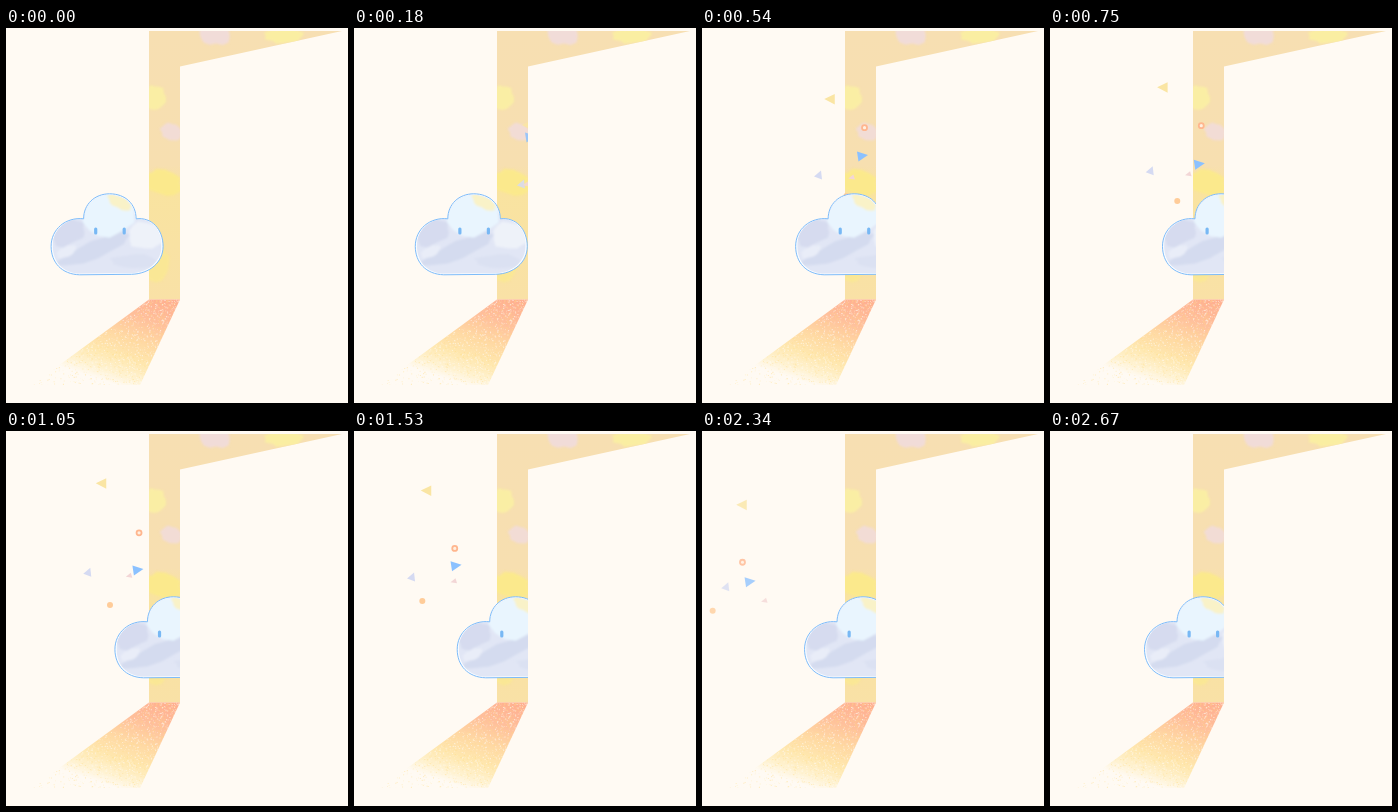
An HTML page that plays this animation: 342x375 px, repeating every 2.7 s.

```html
<!DOCTYPE html>
<html lang="en">
<head>
<meta charset="utf-8">
<title>Cloud at the door</title>
<style>
html, body { margin: 0; width: 100%; height: 100%; overflow: hidden; background: #fffaf3; }
svg { display: block; width: 342px; height: 375px; }
</style>
</head>
<body>
<svg viewBox="0 0 342 375" xmlns="http://www.w3.org/2000/svg">
  <defs>
    <path id="shape" d="M33 25.500C33 11 44 .5 59 .5C75 .5 85.500 11 85.500 25.500C101 23.500 112.500 36 112.500 53C112.500 69 99 80.500 81 81L29 81.500C11 81 .5 69 .5 53C.5 36 15 23.500 33 25.500Z"/>
    <clipPath id="frame"><path d="M143 3H336L174 38.5V271.5H143Z"/></clipPath>
    <clipPath id="room"><path d="M0 0H174V375H0Z"/></clipPath>
    <clipPath id="floor"><path d="M143 271.5H174L134 357H26Z"/></clipPath>
    <clipPath id="puff"><use href="#shape" transform="translate(1.7 1.2) scale(.97)"/></clipPath>
    <filter id="soft" x="-30%" y="-30%" width="160%" height="160%"><feGaussianBlur stdDeviation="1"/></filter>
    <linearGradient id="wall" gradientUnits="userSpaceOnUse" x1="0" y1="3" x2="0" y2="271">
      <stop offset="0" stop-color="#f7dfb2"/><stop offset=".5" stop-color="#f7dfb0"/>
      <stop offset=".6" stop-color="#f9e3a0"/><stop offset="1" stop-color="#f9e1a6"/>
    </linearGradient>
    <linearGradient id="light" gradientUnits="userSpaceOnUse" x1="156" y1="271" x2="126" y2="362">
      <stop offset="0" stop-color="#ffaf90"/><stop offset=".25" stop-color="#ffbf9b"/>
      <stop offset=".5" stop-color="#ffd9a4"/><stop offset=".7" stop-color="#ffe7ae"/>
      <stop offset=".88" stop-color="#fff2d0"/><stop offset="1" stop-color="#fffaf3"/>
    </linearGradient>
  </defs>

  <rect width="342" height="375" fill="#fffaf3"/>

  <g clip-path="url(#frame)">
    <rect x="140" width="200" height="275" fill="url(#wall)"/>
    <g id="paint" filter="url(#soft)"></g>
  </g>

  <g clip-path="url(#floor)">
    <rect x="20" y="270" width="160" height="90" fill="url(#light)"/>
    <path id="gold" fill="#ffdc85" opacity=".45"/>
    <path id="grain" fill="#fffaf3" opacity=".6"/>
  </g>

  <g clip-path="url(#room)">
    <g id="bits"></g>
    <g id="cloud">
      <use href="#shape" fill="#f8fbff"/>
      <g clip-path="url(#puff)">
        <rect width="113" height="82" fill="#e1e6f5"/>
        <g id="tint" filter="url(#soft)"></g>
      </g>
      <use href="#shape" fill="none" stroke="#7dbbf9"/>
      <g fill="#78b8f4">
        <rect x="43.500" y="34.300" width="3.200" height="7" rx="1.500"/>
        <rect x="72" y="34.300" width="3.200" height="7" rx="1.500"/>
      </g>
    </g>
  </g>
</svg>
<script>
const LOOP = 2700, STEP = 30;
const el = id => document.getElementById(id);

let seed = 17;
const rnd = () => (seed = (seed * 16807) % 2147483647) / 2147483647;

function addPath(parent, d, attrs) {
  const node = document.createElementNS('http://www.w3.org/2000/svg', 'path');
  node.setAttribute('d', d);
  for (const k in attrs) node.setAttribute(k, attrs[k]);
  el(parent).append(node);
  return node;
}

// Ragged oval brush mark
function blob(parent, fill, x, y, rx, ry, turn = 0) {
  const n = 16, pts = [];
  for (let i = 0; i < n; i++) {
    const a = i / n * Math.PI * 2, r = 0.85 + 0.3 * rnd();
    pts.push(`${(rx * r * Math.cos(a)).toFixed(1)} ${(ry * r * Math.sin(a)).toFixed(1)}`);
  }
  addPath(parent, `M${pts.join('L')}Z`, { fill, transform: `translate(${x} ${y}) rotate(${turn})` });
}

blob('paint', '#f1dcd8', 210, 6, 16, 11);
blob('paint', '#faeea2', 278, 8, 19, 8);
blob('paint', '#faeea4', 149, 69, 11, 12);
blob('paint', '#f2dcd5', 165, 104, 11, 9, 35);
blob('paint', '#fbe98c', 156, 155, 21, 12, 15);
blob('paint', '#fae795', 150, 235, 15, 18);

blob('tint', '#d6dbef', 17, 39, 19, 13, -15);
blob('tint', '#d4dbef', 44, 56, 40, 9, -23);
blob('tint', '#e9f5fe', 59, 20, 28, 24);
blob('tint', '#eef2f9', 95, 42, 18, 14);
blob('tint', '#dbe1f2', 84, 68, 24, 7);
blob('tint', '#e9edf8', 16, 58, 11, 5, -25);
blob('tint', '#f9f2c8', 69, 9, 13, 6, 25);

// Speckles over the light, denser towards its far edge
function spray(id, count, power, size) {
  let d = '';
  for (let i = 0; i < count; i++) {
    const v = 1 - Math.pow(rnd(), power);
    const left = 143 - 117 * v, right = 174 - 40 * v;
    const x = left + (right - left) * rnd(), s = size * (0.5 + rnd());
    d += `M${x.toFixed(1)} ${(271.5 + 85.5 * v).toFixed(1)}h${s.toFixed(1)}v${s.toFixed(1)}h${(-s).toFixed(1)}z`;
  }
  el(id).setAttribute('d', d);
}
spray('gold', 700, 1.1, 0.8);
spray('grain', 1000, 1.7, 0.8);

const disc = r => `M${-r} 0A${r} ${r} 0 1 1 ${r} 0A${r} ${r} 0 1 1 ${-r} 0Z`;

// Each bit drifts between two points: pow bends its speed, arc and wave bend its height
const bits = [
  { d: 'M-6 0L4.500 -5L4.500 5.500Z', fill: '#fae5a3', from: [151, 84], to: [54, 67.5], pow: 0.66, arc: -23, wave: -5 },
  { d: 'M-5 -4.500L6 -1L-3.500 5.500Z', fill: '#8bc1ff', from: [168, 118.5], to: [72, 143], pow: 1.13, arc: 7, wave: 7 },
  { d: disc(2.5), fill: '#fff0e0', stroke: '#ffb68e', from: [170, 103.5], to: [68, 125.5], pow: 1.19, arc: -9, wave: -5 },
  { d: disc(3), fill: '#ffcc99', from: [161, 162], to: [36, 175], pow: 0.92, arc: 4.4, wave: 4.8 },
  { d: 'M-4.500 1L2.500 -5L3.500 4Z', fill: '#d5daf2', from: [142, 152], to: [38, 152], pow: 0.64, arc: -9.7, wave: -2 },
  { d: 'M-3.500 1L1.500 -3L3 2Z', fill: '#f3d6d6', from: [161, 153], to: [79, 161], pow: 0.91, arc: -11.8, wave: -0.5 }
];
for (const b of bits) {
  b.node = addPath('bits', b.d, { fill: b.fill, stroke: b.stroke || 'none', 'stroke-width': 1.8 });
}

const clamp = v => Math.max(0, Math.min(1, v));
const mix = (a, b, u) => a + (b - a) * u;

function cloudX(t) {
  if (t < 750) return mix(44.6, 112, t / 750);
  if (t < 1530) return mix(112, 102.7, (t - 750) / 780);
  if (t < 1980) return mix(102.7, 110.8, (t - 1530) / 450);
  return mix(110.8, 93.3, (t - 1980) / 720);
}

function draw(t) {
  el('cloud').setAttribute('transform', `translate(${cloudX(t).toFixed(2)} 165.3)`);
  const u = (t - 360) / 1620;
  const fade = Math.min(clamp((t - 60) / 140), clamp((2640 - t) / 390));
  for (const b of bits) {
    const x = mix(b.from[0], b.to[0], Math.sign(u) * Math.pow(Math.abs(u), b.pow));
    const y = mix(b.from[1], b.to[1], u) + b.arc * Math.sin(Math.PI * u) + b.wave * Math.sin(2 * Math.PI * u);
    b.node.setAttribute('transform', `translate(${x.toFixed(2)} ${y.toFixed(2)})`);
    b.node.setAttribute('opacity', fade.toFixed(3));
  }
}

const start = performance.now();
function tick() {
  const t = (performance.now() - start) % LOOP;
  draw(Math.floor(t / STEP) * STEP);
  requestAnimationFrame(tick);
}
draw(0);
requestAnimationFrame(tick);
</script>
</body>
</html>
```
